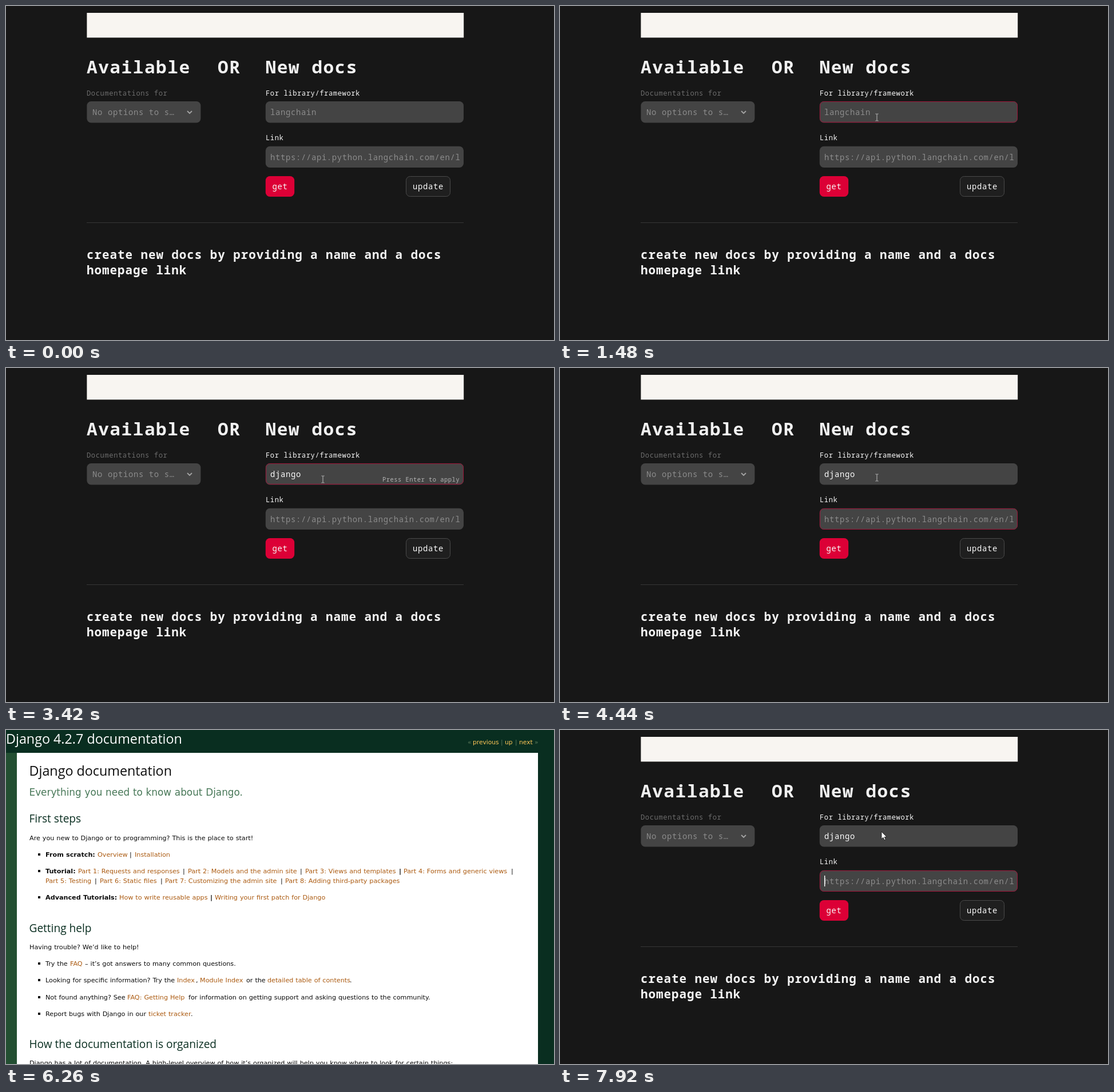
Animation of 958 by 585 pixels, one loop 7.99 s. Source, as an HTML page:

```html
<!DOCTYPE html>
<html lang="en">
<head>
<meta charset="utf-8">
<title>Docs picker</title>
<style>
  html, body { margin: 0; width: 100%; height: 100%; overflow: hidden; background: #171717; }
  svg { display: block; width: 958px; height: 585px; }
  text { white-space: pre; }
  #form { font: 13.9px "Noto Sans Mono", monospace; fill: #fafafa; }
  #form text { letter-spacing: .047em; }
  #form .title { font-size: 31.2px; font-weight: 600; fill: #f1f1f1; }
  #form .lead { font-size: 20.85px; font-weight: 600; fill: #f4f4f4; }
  #form .label { font-size: 12.15px; }
  #form .hint { font-size: 10.45px; fill: #b4b4b4; }
  #form .muted { fill: #6c6c6c; }
  #form .ghost { fill: #8c8c8c; }
  .field { fill: #444; }
  .ring { fill: none; stroke: #a0163a; }
  #manual { font: 11.2px "DejaVu Sans", sans-serif; word-spacing: .034em; fill: #0c0c0c; }
  #manual .h1, #manual .h2 { font-family: "Open Sans", sans-serif; word-spacing: 0; }
  #manual .h1 { font-size: 23.3px; }
  #manual .h2 { font-size: 19.1px; fill: #092e20; }
  #manual .sub { font-size: 16.85px; fill: #487858; }
  #manual .nav { font-size: 10.7px; fill: #ffc757; }
  #manual .dim { fill: #5c7a5c; }
  #manual .link { fill: #ab5a10; }
  #manual .strong { font-weight: 700; }
</style>
</head>
<body>
<svg viewBox="0 0 958 585">
  <defs>
    <clipPath id="inner"><rect x="456" y="247" width="337" height="35"/></clipPath>
  </defs>

  <g id="form">
    <rect width="958" height="585" fill="#171717"/>
    <rect x="141.400" y="12" width="658.800" height="43.400" fill="#f8f5f1"/>
    <text class="title" x="141" y="118">Available</text>
    <text class="title" x="370" y="118">OR</text>
    <text class="title" x="453.500" y="118">New docs</text>

    <text class="label muted" x="141" y="156.500">Documentations for</text>
    <rect class="field" x="141.400" y="167" width="199" height="37.400" rx="7.500"/>
    <text class="ghost" x="151" y="191">No options to s…</text>
    <path d="M317 184l4 4 4-4" fill="none" stroke="#a4a4a4" stroke-width="1.800"/>

    <text class="label" x="454" y="156.500">For library/framework</text>
    <rect class="field" x="453.800" y="167" width="346.200" height="37.400" rx="7.500"/>
    <rect class="ring" id="nameRing" x="454.500" y="167.500" width="345" height="36" rx="7"/>
    <text id="name" x="462" y="191"></text>
    <text class="hint" id="hint" x="658" y="199">Press Enter to apply</text>

    <text class="label" x="454" y="235">Link</text>
    <rect class="field" x="453.800" y="245.800" width="346.200" height="37.200" rx="7.500"/>
    <rect class="ring" id="linkRing" x="454.500" y="246.500" width="345" height="36" rx="7"/>
    <text class="ghost" x="462" y="269.500" clip-path="url(#inner)">https://api.python.langchain.com/en/l</text>
    <rect id="caret" width="1.400" height="19" fill="#fff"/>

    <rect x="453.800" y="298" width="50.400" height="36" rx="7.500" fill="#dc0036"/>
    <text x="465.500" y="321">get</text>
    <rect x="699.500" y="298.500" width="77" height="35" rx="7" fill="#1f1f1f" stroke="#4a4a4a"/>
    <text x="711" y="321">update</text>

    <rect x="141" y="379" width="659" height="1" fill="#373737"/>
    <text class="lead" x="141" y="443">create new docs by providing a name and a docs</text>
    <text class="lead" x="141" y="470">homepage link</text>
  </g>

  <g id="manual">
    <rect width="958" height="585" fill="#092e20"/>
    <rect y="40" width="19" height="545" fill="#234f32"/>
    <rect x="19" y="40" width="911" height="545" fill="#fff"/>
    <text class="h1" x="0" y="24" fill="#fff">Django 4.2.7 documentation</text>
    <text class="nav" y="25"><tspan class="dim" x="807">«</tspan><tspan x="816">previous</tspan><tspan class="dim" x="865">|</tspan><tspan x="872">up</tspan><tspan class="dim" x="890">|</tspan><tspan x="897">next</tspan><tspan class="dim" x="924">»</tspan></text>
    <text class="h1" x="40.500" y="80">Django documentation</text>
    <text class="sub" x="40.500" y="115">Everything you need to know about Django.</text>
    <text class="h2" x="40.500" y="162">First steps</text>
    <text class="h2" x="40.500" y="354">Getting help</text>
    <text class="h2" x="40.500" y="557">How the documentation is organized</text>
  </g>

  <g id="cursor">
    <path id="beam" d="M-2.500-6h2l.5.500.500-.500h2M0-5.500v11M-2.500 6h2l.500-.500.500.500h2" fill="none" stroke="#bdbdbd"/>
    <path id="arrow" d="M0 0v13l3-2.800 2 4.600 2.200-1-2-4.400h4z" fill="#fff" stroke="#111" stroke-width=".8"/>
  </g>
</svg>

<script>
const LOOP = 7990;
const $ = id => document.getElementById(id);

// Run: x, optional mark (* strong, _ link), text. A leading "-" adds a bullet.
const rows = {
  193: ['41Are you new to Django or to programming? This is the place to start!'],
  222: ['-', '69*From scratch:', '160_Overview', '216|', '225_Installation'],
  251: ['-', '69*Tutorial:', '126_Part 1: Requests and responses', '309|',
    '318_Part 2: Models and the admin site', '514|', '523_Part 3: Views and templates', '687*|',
    '695_Part 4: Forms and generic views', '883|'],
  268: ['69_Part 5: Testing', '155|', '164_Part 6: Static files', '270|',
    '278_Part 7: Customizing the admin site', '480|', '488_Part 8: Adding third-party packages'],
  297: ['-', '69*Advanced Tutorials:', '198_How to write reusable apps', '357*|',
    '365_Writing your first patch for Django'],
  384: ['41Having trouble? We’d like to help!'],
  413: ['-', '69Try the', '112_FAQ', '138– it’s got answers to many common questions.'],
  442: ['-', '69Looking for specific information? Try the', '299_Index', '332,', '339_Module Index',
    '420or the', '457_detailed table of contents', '601.'],
  472: ['-', '69Not found anything? See', '212_FAQ: Getting Help',
    '319for information on getting support and asking questions to the community.'],
  501: ['-', '69Report bugs with Django in our', '249_ticket tracker', '323.'],
  587: ['41Django has a lot of documentation. A high-level overview of how it’s organized will help you know where to look for certain things:']
};

const marks = { '*': 'strong', _: 'link', '': '' };
const drawRun = run => {
  const [, x, mark, words] = run.match(/^(\d+)([*_]?)(.*)$/);
  return `<tspan x="${x}" class="${marks[mark]}">${words}</tspan>`;
};
const drawRow = ([y, runs]) => {
  const bullet = runs[0] === '-' ? `<rect x="56" y="${y - 6}" width="4" height="4"/>` : '';
  return `${bullet}<text y="${y}">${runs.filter(r => r !== '-').map(drawRun).join('')}</text>`;
};
$('manual').insertAdjacentHTML('beforeend', Object.entries(rows).map(drawRow).join(''));

// Step tables: [time, value], each value holds until the next time.
const typed = [[0, 0], [1810, 1], [2010, 2], [2110, 3], [2220, 4], [2820, 5], [2890, 6]];
const nameFocus = [[0, 0], [1080, .5], [1150, 1], [3890, .5], [3960, 0]];
const linkFocus = [[0, 0], [3890, .5], [3960, 1], [7520, .6], [7580, 1]];
const caretOn = [[0, 0], [1080, 1], [1480, 0], [1810, 1], [2750, 0], [2820, 1], [3420, 0],
  [3890, 1], [4440, 0], [4970, 1], [5500, 0], [5980, 1]];
const manualOn = [[0, 0], [6260, 1], [7520, 0]];
const at = (table, t) => table.findLast(step => step[0] <= t)[1];

// Pointer moves: start, end, number of steps, way points, stays visible afterwards.
const moves = [
  [260, 1020, 12, [[107, 570], [860, 430], [554, 195]], true],
  [4440, 4640, 3, [[554, 192], [549, 190]], true],
  [5500, 5980, 7, [[540, 186], [7, 52]], false],
  [7780, 7920, 3, [[364, 73], [562, 178]], true]
];

function pointer(t) {
  const move = moves.findLast(m => m[0] <= t);
  if (!move) return null;
  const [start, end, steps, points, stays] = move;
  if (t >= end && !stays) return null;
  const n = steps - 1;
  const k = Math.min(n, Math.floor((t - start) / (end - start) * n + 1e-6)) / n;
  const along = k * (points.length - 1);
  const i = Math.min(points.length - 2, Math.floor(along));
  return points[i].map((v, axis) => v + (points[i + 1][axis] - v) * (along - i));
}

const show = (id, on) => $(id).setAttribute('visibility', on ? 'visible' : 'hidden');

function render(t) {
  const count = at(typed, t);
  const onLink = t >= 3890;
  $('name').textContent = count ? 'django'.slice(0, count) : 'langchain';
  $('name').setAttribute('class', count ? '' : 'ghost');
  show('hint', count && !onLink);
  $('nameRing').style.opacity = at(nameFocus, t);
  $('linkRing').style.opacity = at(linkFocus, t);
  $('caret').setAttribute('x', onLink ? 462 : 462 + 9 * count);
  $('caret').setAttribute('y', onLink ? 255 : 177);
  show('caret', at(caretOn, t));
  $('form').style.display = at(manualOn, t) ? 'none' : '';
  $('manual').style.display = at(manualOn, t) ? '' : 'none';

  const pos = pointer(t);
  $('cursor').style.display = pos ? '' : 'none';
  if (pos) {
    const [x, y] = pos.map(Math.round);
    const inField = t < 6000 && x > 454 && x < 800 && y > 167 && y < 204;
    $('cursor').setAttribute('transform', `translate(${x} ${y})`);
    show('beam', inField);
    show('arrow', !inField);
  }
}

const begin = performance.now();
function tick() {
  render((performance.now() - begin) % LOOP);
  requestAnimationFrame(tick);
}
tick();
</script>
</body>
</html>
```
